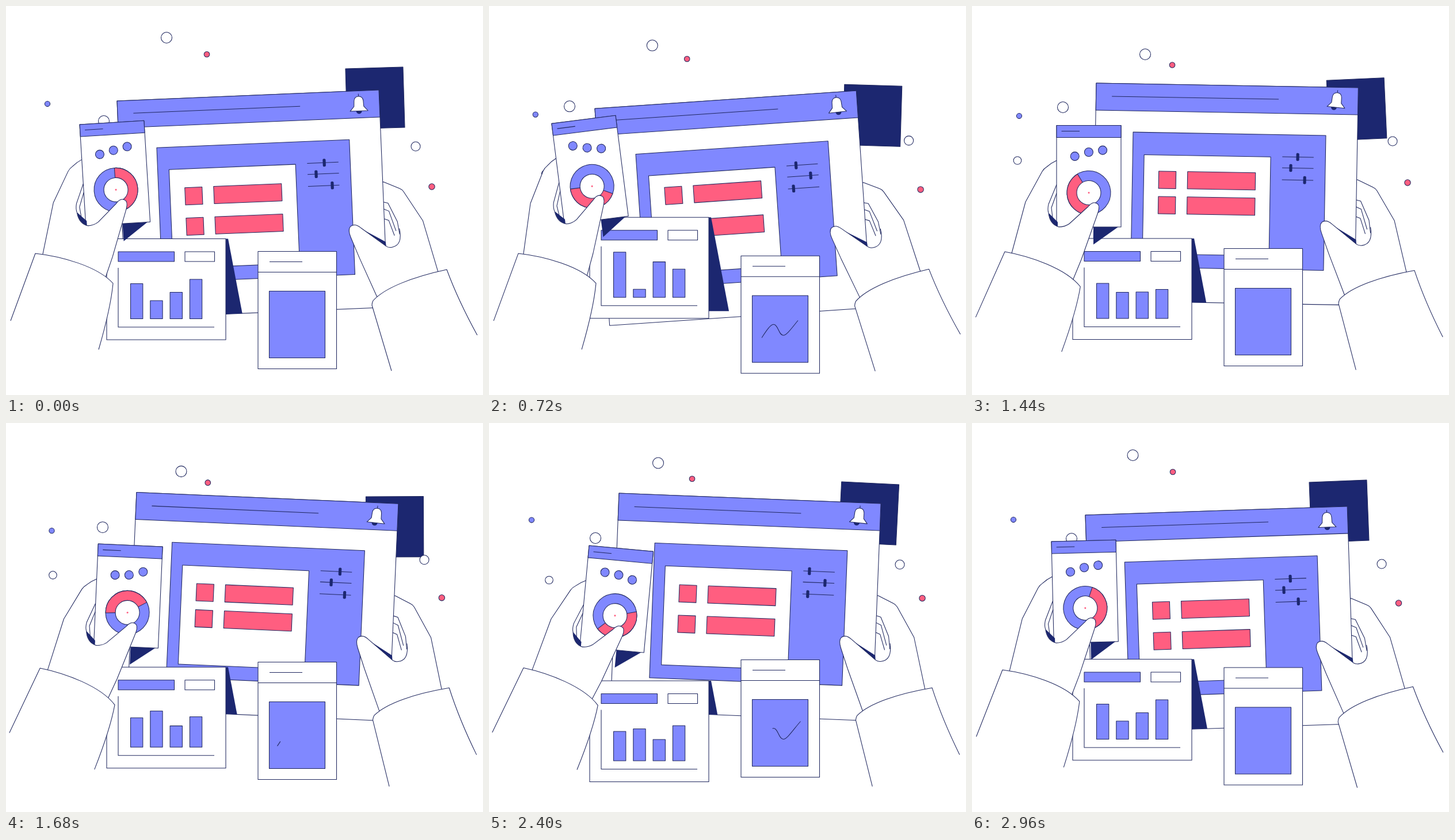
Recreate the animation shown at these times as an HTML page with a canvas. Size 829 by 676 pixels, loop 3040 ms.

```html
<!DOCTYPE html>
<html lang="en">
<head>
<meta charset="utf-8">
<title>Dashboard in hands</title>
<style>
  html, body { margin: 0; width: 100%; height: 100%; overflow: hidden; background: #fff; }
  canvas { display: block; width: 829px; height: 676px; }
</style>
</head>
<body>
<canvas id="stage"></canvas>
<script>
const W = 829, H = 676, LOOP = 3040, HALF = LOOP / 2, STEP = 80;
const BLUE = '#8088ff', NAVY = '#1c2770', PINK = '#ff5e80', WHITE = '#fff', INK = '#20285f';

const canvas = document.getElementById('stage');
const ctx = canvas.getContext('2d');
const dpr = window.devicePixelRatio || 1;
canvas.width = W * dpr;
canvas.height = H * dpr;

// Smooth periodic curve through (times, values)
function curve(times, values, period) {
  const n = times.length;
  const at = i => times[(i + n) % n] + Math.floor(i / n) * period;
  const val = i => values[(i + n) % n];
  const rate = i => (val(i + 1) - val(i)) / (at(i + 1) - at(i));
  const slope = i => {
    const a = at(i) - at(i - 1), b = at(i + 1) - at(i);
    return (rate(i - 1) * b + rate(i) * a) / (a + b);
  };
  return t => {
    t %= period;
    let i = n - 1;
    while (times[i] > t) i--;
    const d = at(i + 1) - at(i), u = (t - at(i)) / d, u2 = u * u, u3 = u2 * u;
    return (2 * u3 - 3 * u2 + 1) * val(i) + (u3 - 2 * u2 + u) * d * slope(i)
      + (3 * u2 - 2 * u3) * val(i + 1) + (u3 - u2) * d * slope(i + 1);
  };
}

const KEYS = [0, 400, 1040, 1440, 2000, 2400, 2960];
const HALF_KEYS = [0, 400, 480, 880, 1040, 1440];
const track = (...v) => curve(KEYS, v, LOOP);
const halfTrack = (...v) => curve(HALF_KEYS, v, HALF);

const tablet = {
  x: track(193, 181, 195, 216, 235, 226, 197),
  y: track(165, 183, 162, 134, 111, 122, 160),
  a: track(-2.4, -4.4, -2.14, 1, 3.53, 2.27, -1.9)
};
const phone = {
  x: track(128, 106, 123, 147, 173, 174, 138),
  y: track(206, 204.5, 205, 207.5, 213, 213, 206),
  a: track(-3.5, -7.9, -4.4, 0, 5, 5.3, -1.4)
};
const square = {
  x: track(641.5, 663.5, 664.5, 668.5, 680.5, 660, 638),
  y: track(160, 192, 180.5, 179.5, 177.5, 157, 153.5),
  a: track(-1.7, 2.2, -0.3, -2.6, 3.7, 2.9, -2.2)
};
const dots = [
  { r: 9.5, c: WHITE, x: track(279, 279, 291, 301, 304.5, 294, 279.5), y: track(55, 61, 76.5, 84, 80, 69.5, 56) },
  { r: 4.8, c: PINK, x: track(349, 346, 344, 348, 353.5, 353, 349), y: track(84, 88, 96.5, 102.5, 102.5, 97, 85) },
  { r: 4.6, c: BLUE, x: track(72, 76, 84, 82, 76, 74, 72), y: track(170, 182, 192, 191, 179.5, 168.5, 168) },
  { r: 9.5, c: WHITE, x: track(170, 146, 143.5, 158, 179.5, 185, 173), y: track(200, 183, 171, 176, 189.5, 200, 201) },
  { r: 6.8, c: WHITE, x: track(123, 112, 85.5, 79, 90, 104.5, 122), y: track(292, 297, 282, 268.5, 264, 273, 289) },
  { r: 8, c: WHITE, x: track(712, 723, 733, 731, 720.5, 714, 712), y: track(244, 237, 233, 235, 242, 246, 245) },
  { r: 5.2, c: PINK, x: track(740, 744.5, 755, 757, 756.5, 753, 741.5), y: track(314, 320.5, 314, 307, 301.5, 304.5, 313) }
];
const rows = [
  track(155.5, 150, 143.4, 151, 155.5, 154.7, 155),
  track(208.3, 209, 198.4, 195, 206.6, 207.7, 208)
];
const knobs = [
  halfTrack(355.3, 358, 355, 336, 335.5, 352.3),
  halfTrack(340.4, 357.3, 361.5, 363.8, 357, 340.5),
  halfTrack(367.6, 357, 348, 334.6, 338.2, 365)
];
const bellTilt = track(0, 2, -5, 5, 0.5, 4, 0);
const clapper = track(0, -1, 2.5, -3.5, 1, -3, 0);
const pieTurn = track(269.5, 180.4, -67, 86, 279, 344.5, 290);
const calTop = track(404.5, 373.5, 375.5, 404, 446, 448, 410.5);
const bars = [
  track(61, 70, 80, 61, 43.5, 51, 61),
  track(31.5, 23.5, 14, 45.5, 75, 55.5, 31.5),
  track(46, 53.5, 63.5, 46, 30, 37, 46),
  track(68.5, 57.5, 44.5, 50.5, 55.5, 61, 68.5)
];
const cardTop = track(426.5, 434, 430.5, 421.5, 409.5, 411.5, 425);
const cuffX = track(51, 50, 53, 57, 61, 60, 53);

const shape = d => new Path2D(d);
const BELL = shape('M-15.5 27L-8.5 19L-8 9Q-7 1.5 0 1.5Q7 1.5 8 9L8.5 19L15.5 27Z');
const SCRIBBLE = shape('M14 77C22 65 31 50 37 50C45 50 46 69 54 69C61 69 73 50 84 38');
const SCRIBBLE_LEN = 108;

const rightHand = {
  palm: shape('M549 336L522.2 230L491 178.5Q488 174 484 172.5L457 160L430 160L430 336'),
  fingers: shape('M455 195L463 197L478 230L481 252M455 207L464 211L475 246M455 224L463 227L472 254'),
  shade: shape('M410 237L456 264L457 273Z'),
  thumbFill: shape('M481 240Q487 271 467 274Q461 275 457 272L414 238Q404 229 396 235Q391 241 396 254L409 289L438.5 362.4L445 385L549 336Z'),
  thumb: shape('M481 242Q486 271 467 274Q461 275 457 272L414 238Q404 229 396 235Q391 241 396 254L409 289L438.5 362.4L444 376'),
  sleeve: shape('M34 114L0 0Q0 -4 2 -8C22 -30 70 -49 130 -62Q150 -8 183 52')
};
const leftHand = {
  palm: shape('M-82 237L-78 222L-54 133L-25 80Q-22 75 -17 72Q-9 65 0 61L20 61L20 237'),
  fingers: shape('M0 103L-14 137Q-16 146 -14 152M0 118L-9 143L-7 160'),
  shade: shape('M-14 152Q-12 170 2 176.5L2 168Z'),
  thumbFill: shape('M-14 152Q-12 172 4 176.5Q14 176.5 22 171L55 141Q64 130 72 137Q76 142 70 157L43 233L29 267L25 277L-82 237Z'),
  thumb: shape('M-14 152Q-12 172 4 176.5Q14 176.5 22 171L55 141Q64 130 72 137Q76 142 70 157L43 233L29 267L25 277'),
  sleeve: shape('M-43 117L0 0C45 5 108 22 135 52Q131 95 110 167')
};

function place(x, y, deg, draw) {
  ctx.save();
  ctx.translate(x, y);
  ctx.rotate(deg * Math.PI / 180);
  draw();
  ctx.restore();
}
function paint(path, fill, stroke = true) {
  if (fill) { ctx.fillStyle = fill; ctx.fill(path); }
  if (stroke) ctx.stroke(path);
}
function box(x, y, w, h, fill) {
  const p = new Path2D();
  p.rect(x, y, w, h);
  paint(p, fill);
}
function disc(x, y, r, fill, stroke = true) {
  const p = new Path2D();
  p.arc(x, y, r, 0, 7);
  paint(p, fill, stroke);
}
function line(...pts) {
  ctx.beginPath();
  for (let i = 0; i < pts.length; i += 2) ctx.lineTo(pts[i], pts[i + 1]);
  ctx.stroke();
}
const ease = (t, from, to) => {
  const u = Math.min(1, Math.max(0, (t - from) / (to - from)));
  return u * u * (3 - 2 * u);
};

function drawBell(t) {
  place(419.5, 8, bellTilt(t), () => {
    disc(clapper(t), 27, 5, NAVY, false);
    line(0, -3, 0, 3);
    paint(BELL, WHITE);
  });
}

function drawTablet(t) {
  box(0, 0, 455.4, 378, WHITE);
  box(0, 0, 455.4, 47, BLUE);
  line(27.5, 22.5, 317.5, 22.5);
  drawBell(t);
  box(65.5, 84, 335, 234.5, BLUE);
  box(85.3, 123, 220, 172, WHITE);
  for (const row of rows) {
    box(111.3, row(t), 30, 30, PINK);
    box(161.4, row(t), 118, 30, PINK);
  }
  knobs.forEach((knob, i) => {
    const y = [122.3, 141.6, 162.3][i];
    line(325.5, y, 380, y);
    ctx.fillStyle = NAVY;
    ctx.beginPath();
    ctx.roundRect(knob(t) - 2.6, y - 6.8, 5.2, 13.6, 2);
    ctx.fill();
  });
}

function drawPhone(t) {
  paint(shape('M64 176L107 176.5L64 207Z'), NAVY, false);
  box(0, 0, 112, 176.5, WHITE);
  box(0, 0, 112, 21, BLUE);
  line(8.5, 10, 40, 10);
  [0, 390, 700].forEach((lag, i) => {
    const y = 48.5 + 5.4 * Math.cos(2 * Math.PI * (t - lag) / HALF);
    disc(31.7 + 24.2 * i, y, 7.5, BLUE);
  });
  place(56, 117, pieTurn(t), () => {
    disc(0, 0, 38, BLUE);
    const wedge = new Path2D();
    wedge.moveTo(0, 0);
    wedge.arc(0, 0, 38, 0, 153 * Math.PI / 180);
    wedge.closePath();
    paint(wedge, PINK);
    disc(0, 0, 21, WHITE);
    disc(0, 0, 1.5, PINK, false);
  });
}

function drawCalendar(t, pose) {
  const top = calTop(t);
  // The side flap only shows against the tablet
  ctx.save();
  const rad = pose[2] * Math.PI / 180;
  ctx.translate(pose[0], pose[1]);
  ctx.rotate(rad);
  ctx.beginPath();
  ctx.rect(0, 0, 455.4, 378);
  ctx.clip();
  ctx.rotate(-rad);
  ctx.translate(-pose[0], top - pose[1]);
  paint(shape('M382 0L386 0L417 163L382 163Z'), NAVY, false);
  ctx.restore();

  place(0, top, 0, () => {
    box(175, 0, 207, 175.5, WHITE);
    box(195, 22.5, 97.5, 17, BLUE);
    box(311, 22.5, 51.5, 17, WHITE);
    line(195, 50.5, 195, 153.5, 362, 153.5);
    bars.forEach((bar, i) => {
      const h = bar(t);
      box(216.5 + 34.3 * i, 139 - h, 21.3, h, BLUE);
    });
  });
}

function drawCard(t) {
  place(438, cardTop(t), 0, () => {
    box(0, 0, 136.5, 204, WHITE);
    line(0, 36, 136.5, 36);
    line(20, 18, 77, 18);
    box(19.5, 69, 97, 116, BLUE);
    const s = t % HALF;
    const start = ease(s, 640, 1280) * SCRIBBLE_LEN, end = ease(s, 0, 870) * SCRIBBLE_LEN;
    if (end - start < 0.5) return;
    ctx.translate(19.5, 69);
    ctx.setLineDash([end - start, 999]);
    ctx.lineDashOffset = -start;
    ctx.stroke(SCRIBBLE);
  });
}

function drawGrip(hand) {
  paint(hand.shade, NAVY, false);
  paint(hand.thumbFill, WHITE, false);
  paint(hand.thumb);
}
function drawPalm(hand) {
  paint(hand.palm, WHITE);
  paint(hand.fingers);
}

function render(t) {
  ctx.setTransform(dpr, 0, 0, dpr, 0, 0);
  ctx.fillStyle = WHITE;
  ctx.fillRect(0, 0, W, H);
  ctx.strokeStyle = INK;
  ctx.lineWidth = 1.05;
  ctx.lineJoin = 'round';

  const poseOf = o => [o.x(t), o.y(t), o.a(t)];
  const tab = poseOf(tablet), ph = poseOf(phone);

  place(...poseOf(square), () => box(-50, -52.5, 100, 105, NAVY));
  for (const d of dots) disc(d.x(t), d.y(t), d.r, d.c);

  place(...tab, () => {
    drawPalm(rightHand);
    drawTablet(t);
    drawGrip(rightHand);
  });
  const lean = tab[2] + 2.4;
  place(636 + 0.3 * lean, 520 - 0.8 * lean, 0.55 * lean, () => paint(rightHand.sleeve, WHITE));

  drawCalendar(t, tab);
  drawCard(t);

  place(...ph, () => {
    drawPalm(leftHand);
    drawPhone(t);
    drawGrip(leftHand);
  });
  const shift = cuffX(t) - 51;
  place(51 + shift, 430 - 0.5 * shift, 0.63 * shift, () => paint(leftHand.sleeve, WHITE));
}

const begin = performance.now();
function tick() {
  const t = (performance.now() - begin) % LOOP;
  render(Math.floor(t / STEP) * STEP);
  requestAnimationFrame(tick);
}
tick();
</script>
</body>
</html>
```
